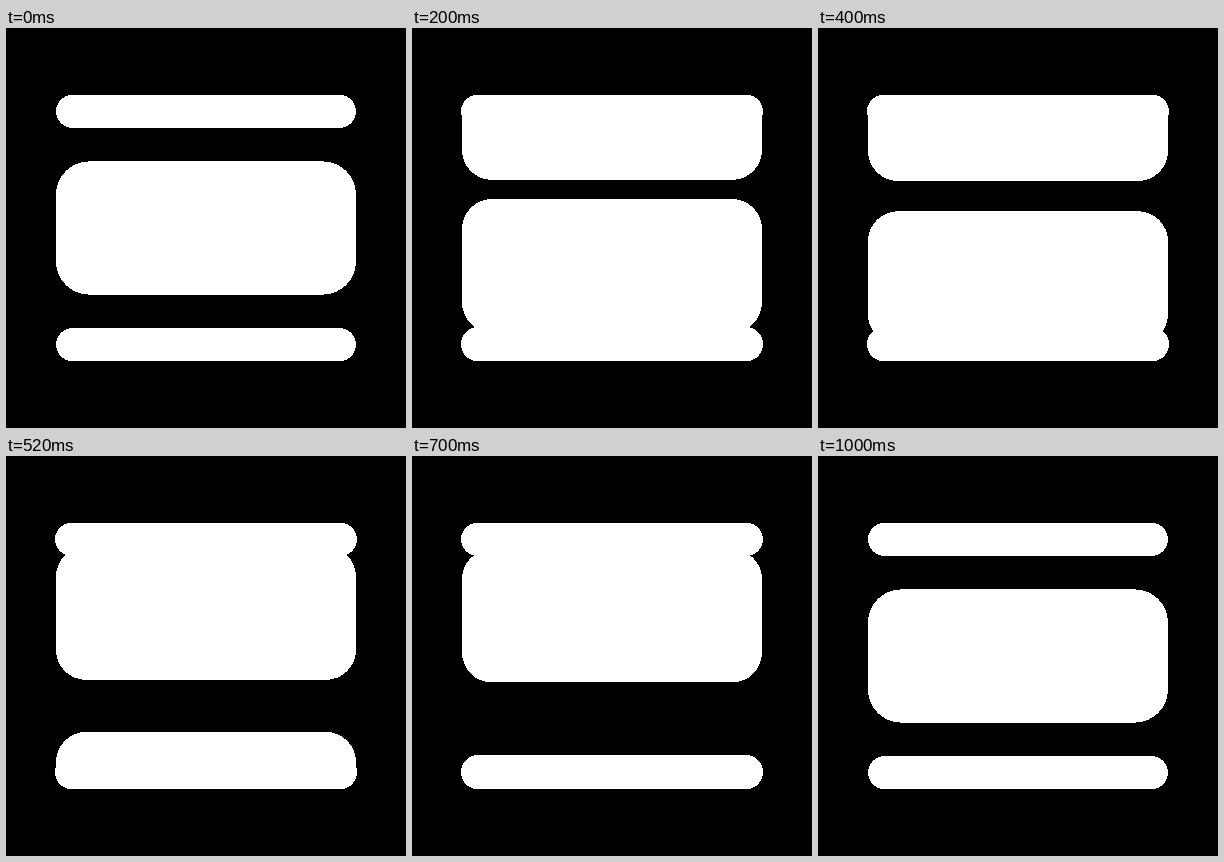
Recreate the animation shown at these times as an HTML page. Size 400 by 400 pixels, loop 1.02 s.

```html
<!DOCTYPE html>
<html lang="en">
<head>
<meta charset="utf-8">
<title>Scrolling cards</title>
<style>
  html, body { margin: 0; height: 100%; overflow: hidden; background: #000; }
  svg { display: block; width: 100vw; height: 100vh; }
</style>
</head>
<body>
<svg viewBox="0 0 400 400" fill="#fff" shape-rendering="crispEdges">
  <clipPath id="window"><rect y="84" width="400" height="232"/></clipPath>
  <g id="cards" clip-path="url(#window)"></g>
  <g id="bars"></g>
</svg>
<script>
const LOOP = 1020;
const CENTER = 200;
const HIDDEN = 33; // centre of a card tucked behind the top bar
const STEP = CENTER - HIDDEN;
const PASS = 360;  // from behind one bar to behind the other
const CARD_HEIGHT = 400 / 3;

const easeIn = power => u => u ** power;
const easeInOut = u => (1 - Math.cos(Math.PI * u)) / 2;
const easeOutBack = pull => u => 1 + (pull + 1) * (u - 1) ** 3 + pull * (u - 1) ** 2;

// Distance moved by time t
function travel(t, start, duration, distance, ease) {
  const u = Math.max(0, (t - start) / duration);
  return distance * ease(Math.min(1, u));
}

// Centres of the cards: one leaves, two pass through, the last one settles
const centers = [
  t => CENTER + travel(t, 0, 330, STEP, easeIn(3)),
  t => HIDDEN + travel(t, 44, 631, PASS, easeInOut),
  t => HIDDEN + travel(t, -109, 822, PASS, easeIn(4)),
  t => HIDDEN + travel(t, 587.5, 412.5, STEP, easeOutBack(0.97))
];

function addRect(parent) {
  const rect = document.createElementNS("http://www.w3.org/2000/svg", "rect");
  return document.getElementById(parent).appendChild(rect);
}

function place(rect, x, y, width, height, rx) {
  for (const [name, value] of Object.entries({ x, y, width, height, rx })) {
    rect.setAttribute(name, value);
  }
}

const cards = centers.map(() => addRect("cards"));
const topBar = addRect("bars");
const bottomBar = addRect("bars");

function draw(t) {
  const moving = t >= 20 && t < 1000;
  cards.forEach((card, i) => {
    const top = centers[i](t) - CARD_HEIGHT / 2;
    place(card, 50, top, 300, CARD_HEIGHT, moving ? 30 : 33.3);
  });
  // The bars swell by a pixel while the cards move
  const grow = moving ? 1 : 0;
  const width = 300 + 2 * grow;
  place(topBar, 50 - grow, 66.7, width, 33.3, 17);
  place(bottomBar, 50 - grow, 300 - grow, width, 33.3 + grow, 17);
}

const start = performance.now();
function tick() {
  draw((performance.now() - start) % LOOP);
  requestAnimationFrame(tick);
}
tick();
</script>
</body>
</html>
```
